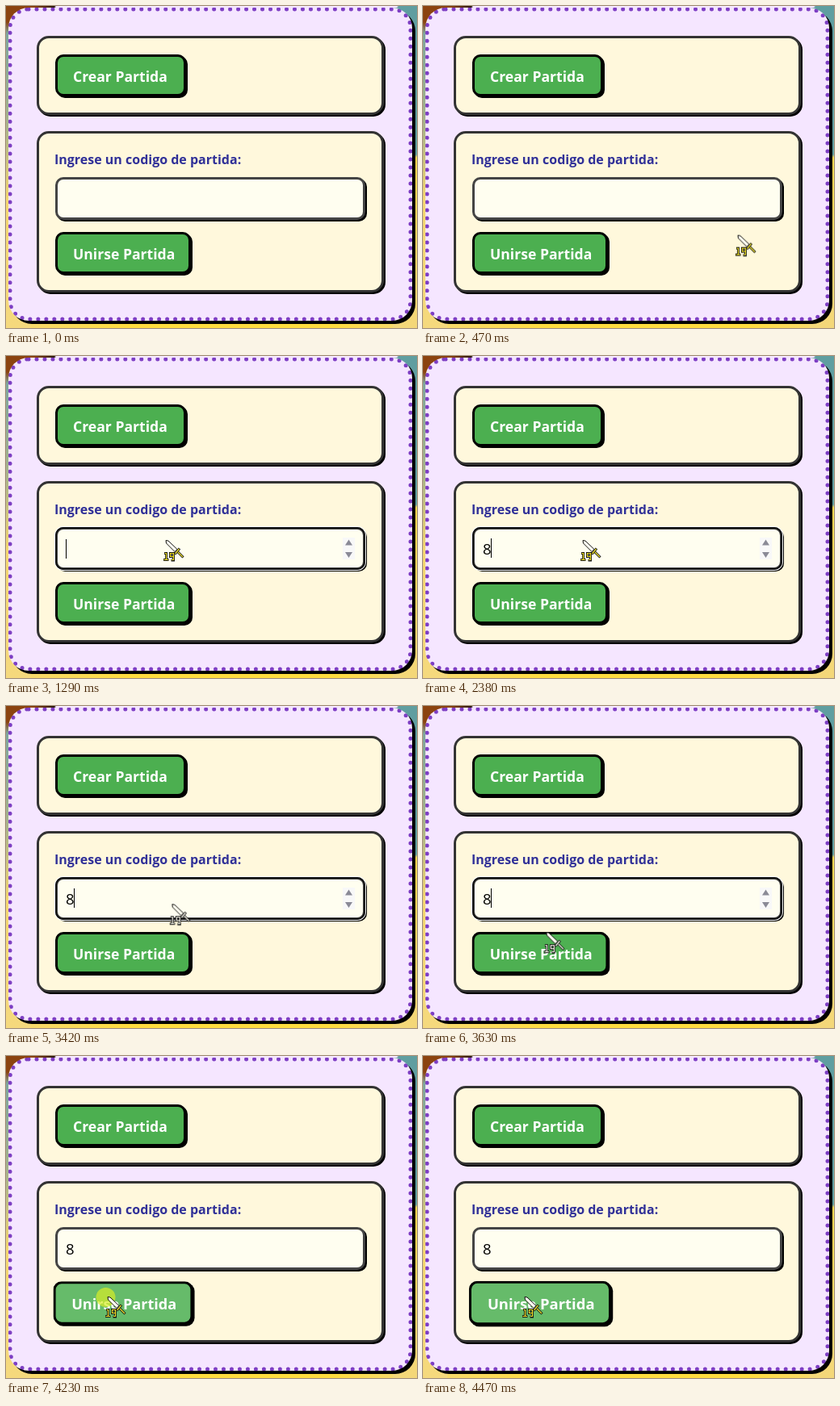
An HTML page that plays this animation: 509 by 399 pixels, repeating every 4530 ms.

```html
<!DOCTYPE html>
<html lang="es">
<head>
<meta charset="utf-8">
<title>Partida</title>
<style>
  html, body { margin: 0; width: 100%; height: 100%; overflow: hidden; }
  #stage {
    position: absolute; inset: 0; width: 509px; height: 399px; overflow: hidden;
    font-family: "Open Sans", "Noto Sans", sans-serif; font-weight: 700;
    background:
      linear-gradient(90deg, #8b430f 34px, #2c1a10 60px, #f5e6ff 62px 484px, #5f9ea0 486px) 0 0 / 100% 2px no-repeat,
      linear-gradient(#8b430f 20px, #7fa69c 34px, #a9b489 150px, #f3d670 240px, #f5d97d) 0 0 / 30px 100% no-repeat,
      linear-gradient(#5f9ea0 184px, #ffd84d 188px, #f3d77a) 100% 0 / 30px 100% no-repeat,
      linear-gradient(90deg, #f5d976, #ffdc3f 30%, #ffdc3f 80%, #f3d77a);
  }
  #stage * { box-sizing: border-box; }
  #stage > * { position: absolute; }
  .panel {
    left: 3px; top: 2px; width: 500px; height: 388px;
    border: 5px dotted #7e3fc4; border-radius: 25px;
    background: #f5e6ff; box-shadow: 4px 4px 0 #000;
  }
  .card {
    left: 38px; width: 430px;
    border: 3px solid #333; border-radius: 15px;
    background: #fff8dc; box-shadow: 2px 2px 0 #000;
  }
  .button {
    left: 61px; height: 52px; padding-left: 19px;
    border: 3px solid #000; border-radius: 10px;
    background: #4caf50; box-shadow: 2px 2px 0 #000;
    color: #fff; font-size: 17.6px; line-height: 48px; white-space: nowrap;
  }
  .label { left: 60px; top: 180px; color: #303098; font-size: 16px; line-height: 20px; white-space: nowrap; }
  .field {
    left: 61px; top: 212px; width: 384px; height: 53px; padding-left: 10px;
    border: 3px solid #444; border-radius: 10px;
    outline: 2px solid transparent; outline-offset: -2px;
    background: #fffef0; box-shadow: 0 0 0 0 #fff, 2px 2px 0 #000;
    color: #000; font-size: 18.5px; font-weight: 500; line-height: 47px;
  }
  #caret { left: 74px; top: 227px; width: 1px; height: 24px; background: #000; }
  svg { left: 0; top: 0; overflow: visible; }
</style>
</head>
<body>
<div id="stage">
  <div class="panel"></div>
  <div class="card" style="top:37px;height:98px"></div>
  <div class="card" style="top:155px;height:200px"></div>
  <div class="button" style="top:60px;width:162px">Crear Partida</div>
  <div class="label">Ingrese un codigo de partida:</div>
  <div class="field" id="field"><span id="digit">8</span></div>
  <div id="caret"></div>
  <svg id="spinner" width="509" height="399">
    <path d="M417 225H432V252H417Z" fill="#f8f8f8"/>
    <path d="M420 234.5 424.5 227.5 429 234.5ZM420 243 424.5 250 429 243Z" fill="#8a8a96"/>
  </svg>
  <div class="button" id="join" style="top:280px;width:168px">Unirse Partida</div>
  <svg id="cursor" width="26" height="28">
    <circle id="ripple" cx="-1.5" cy="1" r="12" fill="#d8ec28" fill-opacity=".7"/>
    <path d="M1 .5 4 1 15 11.5 12 14.5 1.5 4Z" fill="#fffdf0" stroke="#111"/>
    <g fill="none" stroke="#111" stroke-width="3">
      <path d="M18 10.5 12 17.5M15.5 14.5 22.5 21.5"/>
      <path d="M-1 16.5H1.5V25M-2 24.5H4.5M10.5 20.5H6.5V16.5H10.5V25H7.5"/>
    </g>
    <g id="gold" fill="none" stroke="#f4e52c" stroke-width="1.2">
      <path d="M17.5 11 12.5 17M16 15 22 21"/>
      <path d="M-.5 16.5H1.5V24.5M-1.5 24.5H4M10.5 20.5H6.5V16.5H10.5V24.5H8"/>
    </g>
  </svg>
</div>
<script>
  const LOOP = 4530;
  const start = document.timeline.currentTime ?? 0;

  // rows: [time in ms, style values]; "hold" keeps each row until the next one
  function play(id, rows, hold = false) {
    const first = rows[0][0] > 0 ? [[0, rows[0][1]]] : [];
    const last = [[LOOP, rows[rows.length - 1][1]]];
    const frames = [...first, ...rows, ...last].map(([time, style]) => ({
      ...style, offset: time / LOOP, easing: hold ? "steps(1, end)" : "linear"
    }));
    const motion = document.getElementById(id).animate(frames, { duration: LOOP, iterations: Infinity });
    motion.startTime = start;
  }

  const toggle = (id, ...rows) =>
    play(id, rows.map(([time, on]) => [time, { opacity: on }]), true);

  const at = (time, x, y) => [time, { transform: `translate(${x}px, ${y}px)` }];
  play("cursor", [
    at(290, 446, 386), at(350, 436, 346), at(440, 412, 295), at(530, 345, 262),
    at(620, 278, 247), at(710, 222, 234), at(790, 197, 228),
    at(3109, 197, 228), at(3110, 250, 224), at(3139, 250, 224), at(3140, 290, 221),
    at(3300, 282, 223), at(3360, 246, 232), at(3420, 205, 245), at(3520, 176, 264),
    at(3630, 152, 280), at(3720, 134, 292), at(3820, 127, 297),
    at(3890, 126, 298), at(3920, 125, 298)
  ]);
  toggle("cursor", [0, 0], [290, 1]);
  play("gold", [
    [0, { stroke: "#f4e52c" }], [3300, { stroke: "#fffdf0" }], [3820, { stroke: "#f4e52c" }]
  ], true);
  toggle("ripple", [0, 0], [1190, 1], [1290, 0], [4230, 1], [4350, 0]);

  toggle("spinner", [0, 0], [500, 1], [4230, 0]);
  toggle("digit", [0, 0], [2380, 1]);
  toggle("caret", [0, 0], [1240, 1], [1770, 0], [2280, 1], [2910, 0], [3420, 1], [3920, 0]);
  play("caret", [
    [0, { transform: "none" }], [2380, { transform: "translate(10px, -1px)" }]
  ], true);

  const blurred = { outlineColor: "transparent", boxShadow: "0 0 0 0 #fff, 2px 2px 0 #000" };
  const focused = { outlineColor: "#101010", boxShadow: "0 0 0 1px #fff, 2px 2px 0 #000" };
  play("field", [[0, blurred], [1240, focused], [4230, blurred]], true);

  const pose = (time, scale, backgroundColor) =>
    [time, { transform: `scale(${scale})`, backgroundColor }];
  const green = "#4caf50", light = "#66bb6a";
  play("join", [
    pose(0, 1, green), pose(3600, 1, green), pose(3630, 1.005, "#4eb052"),
    pose(3820, 1.05, light), pose(4200, 1.05, light), pose(4230, 1.03, light),
    pose(4300, 1.01, light), pose(4470, 1.05, light), pose(4529, 1.05, light),
    pose(4529.5, 1, green)
  ]);
</script>
</body>
</html>
```
